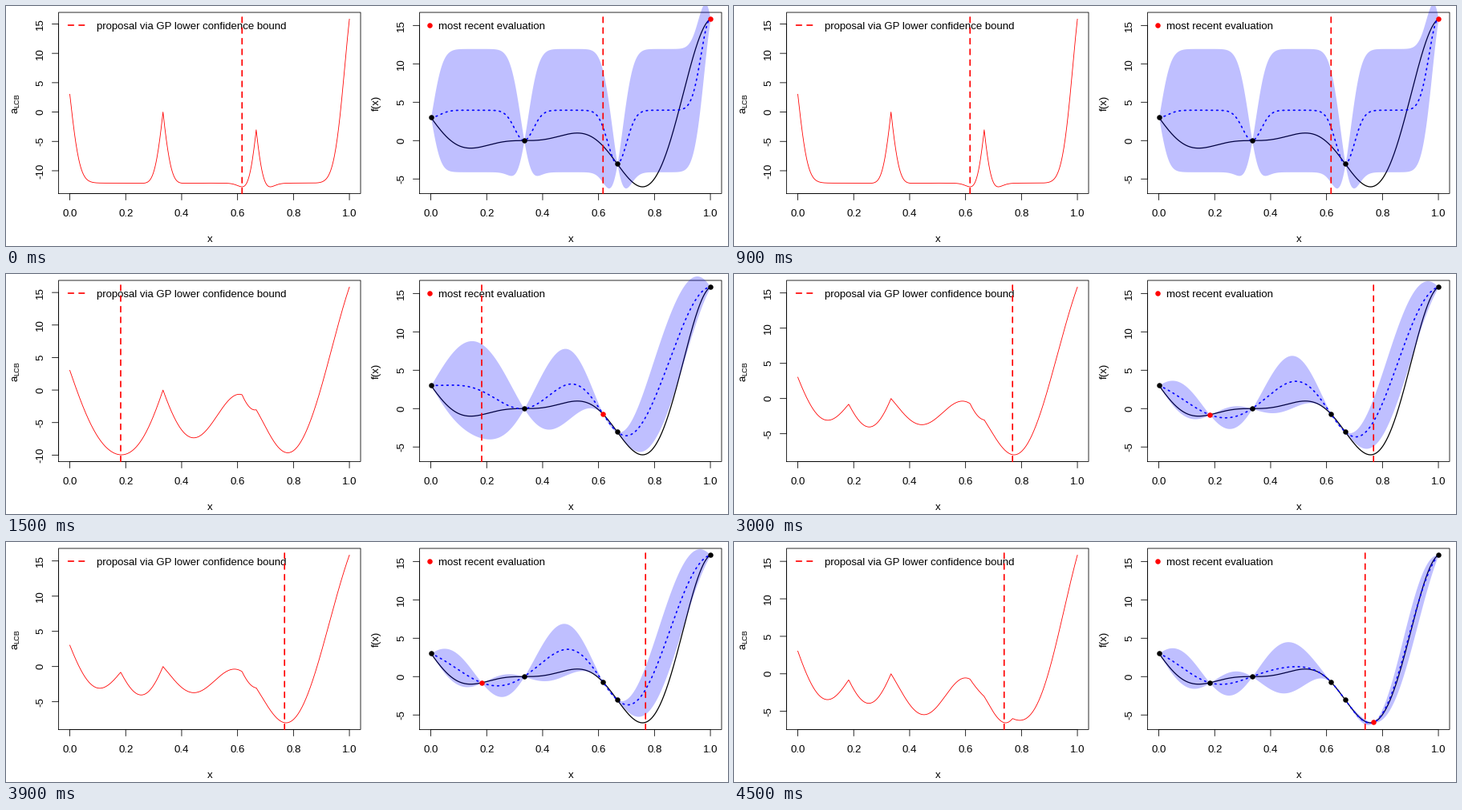
Recreate the animation shown at these times as a matplotlib script. Size 900 px wide and 300 px high, loop 6 s.

```python
import numpy as np
import matplotlib.pyplot as plt
from matplotlib.animation import FuncAnimation
from matplotlib.patches import Rectangle

plt.rcParams.update({"font.family": "Liberation Sans", "path.snap": False})

W, H, DPI = 900, 300, 100
PX = 72 / DPI                 # points per pixel
THIN, THICK = 0.83, 1.67      # line widths in pixels
FONT, LINE = 13.2, 16         # text size and margin line in pixels
BOX_W, TOP, BOTTOM = 376.4, 8, 234.4
DASHED, DOTTED = (0, (4, 4)), (0, (1, 3))

GRID = np.linspace(0, 1, 601)
START = [0, 1 / 3, 2 / 3, 1]
PROPOSALS = [0.616, 0.182, 0.768, 0.738]
START_SCALE = 0.0335
SCALES = np.linspace(0.08, 0.2, 241)


def objective(x):
    return (6 * x - 2) ** 2 * np.sin(12 * x - 4)


def kernel(a, b, scale):
    return np.exp(-0.5 * ((a[:, None] - b[None, :]) / scale) ** 2)


def fit(x, y, scale):
    """Ordinary kriging: inverse correlation, trend, variance and deviance."""
    corr = kernel(x, x, scale)
    inv = np.linalg.inv(corr)
    trend = (inv @ y).sum() / inv.sum()
    var = (y - trend) @ inv @ (y - trend) / len(x)
    deviance = len(x) * np.log(var) + np.linalg.slogdet(corr)[1]
    return inv, trend, var, deviance


def predict(x, y, scale):
    inv, trend, var, _ = fit(x, y, scale)
    r = kernel(x, GRID, scale)
    weights = inv @ r
    mean = trend + weights.T @ (y - trend)
    spread = 1 - (r * weights).sum(0) + (1 - weights.sum(0)) ** 2 / inv.sum()
    return mean, np.sqrt(var * np.maximum(spread, 0))


def run_step(step):
    x = np.array(START + PROPOSALS[:step])
    y = objective(x)
    scale = START_SCALE
    if step:
        scale = min(SCALES, key=lambda s: fit(x, y, s)[3])
    return x, y, *predict(x, y, scale)


STEPS = [run_step(i) for i in range(len(PROPOSALS))]

fig = plt.figure(figsize=(W / DPI, H / DPI), dpi=DPI, facecolor="white")
canvas = fig.add_axes([0, 0, 1, 1])


def line(x, y, color="black", width=THIN, **kw):
    return canvas.plot(x, y, color=color, lw=width * PX, **kw)[0]


def text(x, y, label, size=FONT, ha="center", rotation=0):
    canvas.text(x, y, label, fontsize=size * PX, rotation=rotation,
                ha="right" if rotation and ha == "center" else ha,
                va="center" if rotation and ha == "center" else "baseline")


def dots(x, y, color):
    canvas.plot(x, y, "o", color=color, ms=6.5 * PX, mew=0, zorder=5)


class Panel:
    """A framed plot area that maps data to stage pixels."""

    def __init__(self, left, values):
        self.left, self.right = left, left + BOX_W
        self.low, self.high = values.min(), values.max()
        self.clip = Rectangle((left, TOP), BOX_W, BOTTOM - TOP,
                              transform=canvas.transData)

    def px(self, x):
        return self.left + BOX_W * (np.asarray(x) + 0.04) / 1.08

    def py(self, y):
        share = (np.asarray(y) - self.low) / (self.high - self.low)
        return BOTTOM - (BOTTOM - TOP) * (share + 0.04) / 1.08

    def curve(self, y, color, width=THIN, **kw):
        line(self.px(GRID), self.py(y), color, width,
             clip_path=self.clip, **kw)

    def marker(self, x):
        line([self.px(x)] * 2, [BOTTOM, TOP], "red", THICK, ls=DASHED,
             dash_capstyle="round", clip_path=self.clip, zorder=4)

    def axes(self):
        l, r = self.left, self.right
        line([l, r, r, l, l], [BOTTOM, BOTTOM, TOP, TOP, BOTTOM], zorder=1)
        ticks = np.arange(6) / 5
        line(self.px([0, 1]), [BOTTOM] * 2, zorder=1)
        for t in ticks:
            line([self.px(t)] * 2, [BOTTOM, BOTTOM + LINE / 2], zorder=1)
            text(self.px(t), BOTTOM + 1.8 * LINE, f"{t:.1f}")
        text((l + r) / 2, BOTTOM + 3.8 * LINE, "x")

        pad = 0.04 * (self.high - self.low)
        ticks = [t for t in range(-15, 20, 5)
                 if self.low - pad <= t <= self.high + pad]
        line([l, l], self.py([ticks[0], ticks[-1]]), zorder=1)
        for t in ticks:
            y = self.py(t)
            line([l - LINE / 2, l], [y, y], zorder=1)
            vertical_text(l - 1.2 * LINE, y, str(t))


def vertical_text(x, y, label, size=FONT, va="center"):
    """Text reading upwards with its baseline at x."""
    canvas.text(x, y, label, fontsize=size * PX, rotation=90,
                rotation_mode="anchor", va="baseline",
                ha="center" if va == "center" else "left")


def draw(step):
    x, y, mean, sd = STEPS[step]
    canvas.cla()
    canvas.axis("off")
    canvas.set(xlim=(0, W), ylim=(H, 0))

    bound = mean - 2 * sd
    acq = Panel(65.6, bound)
    acq.axes()
    acq.curve(bound, "red")
    acq.marker(PROPOSALS[step])
    vertical_text(14.4, 134, "a", va="bottom")
    vertical_text(16.4, 126.6, "LCB", 9.2, va="bottom")
    line([77.6, 101.6], [24, 24], "red", THICK, ls=DASHED,
         dash_capstyle="round")
    text(113, 28.8, "proposal via GP lower confidence bound", ha="left")

    truth = objective(GRID)
    model = Panel(515.6, truth)
    model.axes()
    model.curve(truth, "black", 1.25)
    canvas.fill_between(model.px(GRID), model.py(mean - sd),
                        model.py(mean + sd), color="blue", alpha=0.25, lw=0,
                        clip_path=model.clip, zorder=3)
    model.curve(mean, "blue", THICK, ls=DOTTED, dash_capstyle="round",
                zorder=4)
    model.marker(PROPOSALS[step])
    dots(model.px(x[:-1]), model.py(y[:-1]), "black")
    dots(model.px(x[-1]), model.py(y[-1]), "red")
    vertical_text(464.4, 121.2, "f(x)")
    dots(527.5, 24, "red")
    text(539.4, 28.8, "most recent evaluation", ha="left")
    return []


anim = FuncAnimation(fig, draw, frames=len(PROPOSALS), interval=1500,
                     repeat=True, repeat_delay=0)
plt.show()
```
